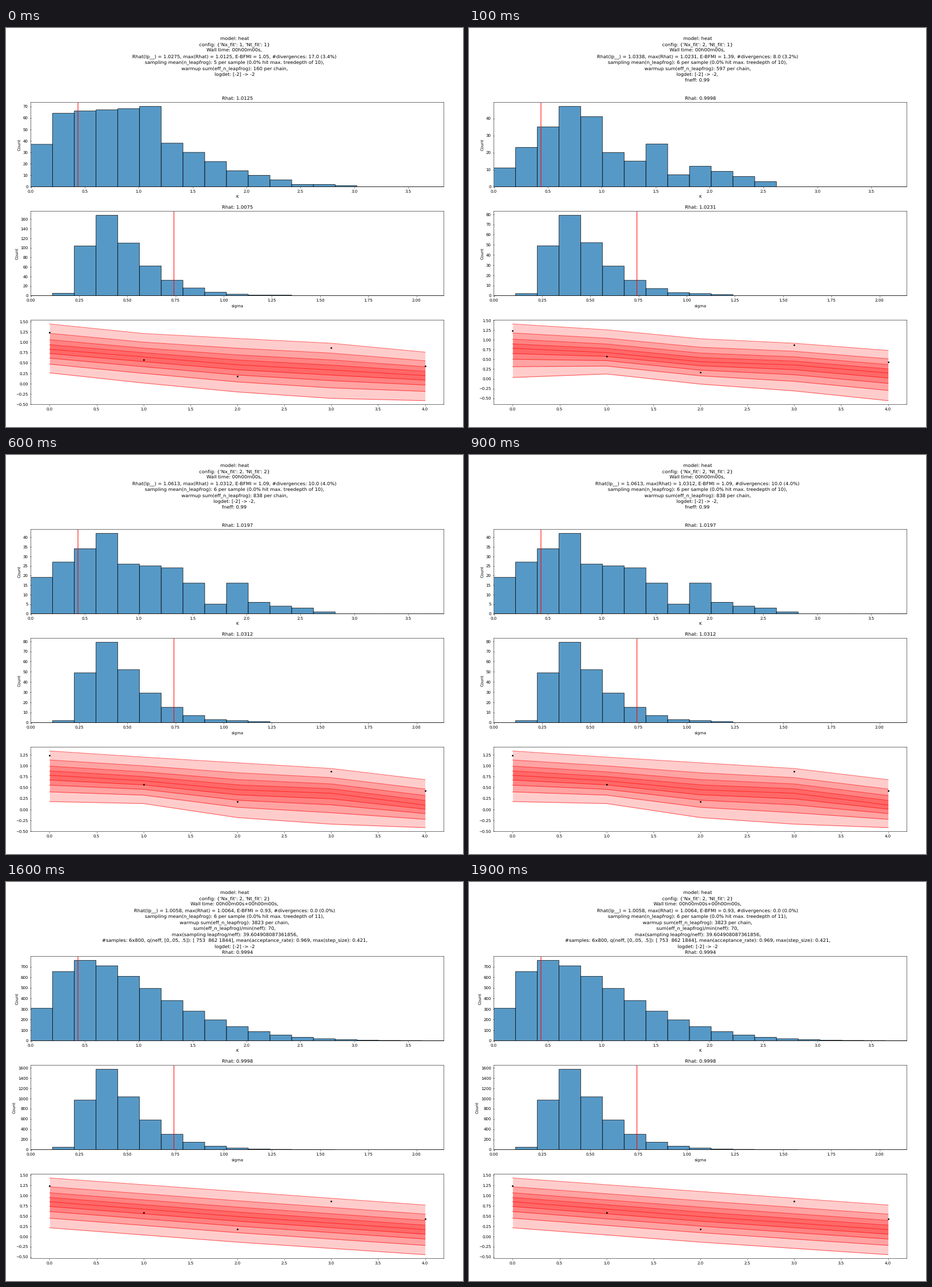
A matplotlib script that plays this animation: 800 by 700 pixels, repeating every 2100 ms.

```python
import numpy as np
import matplotlib.pyplot as plt
from matplotlib.animation import FuncAnimation

plt.rcParams["font.family"] = "DejaVu Sans"
plt.rcParams["text.hinting"] = "none"
plt.rcParams["path.snap"] = False

W, H, DPI = 800, 700, 50
STEP = 100
LINE_PITCH = 10.5
BINS = np.arange(19)
TIMES = np.arange(5)
K_MAX, K_TRUE = 3.831, 0.437
S_MAX, S_TRUE = 2.142, 0.742
OBSERVED = [1.24, 0.575, 0.175, 0.865, 0.43]
# Where the inner quantile lines lie between the median and the outermost ones.
FRACTIONS = (1, 0.63, 0.375, 0.18)


def bump(peak, mode, left, right, left_power, right_power):
    """Skewed bell over the bins, with its own width and power on each side."""
    d = BINS - mode
    fall = np.where(d < 0, (np.abs(d) / left) ** left_power,
                    (np.abs(d) / right) ** right_power)
    return np.round(peak * np.exp(-fall))


def k_posterior(peak):
    return bump(peak, 2, 2.08, 5.0, 2.6, 1.65)


def sigma_posterior(peak):
    return bump(peak, 3, 1.29, 2.0, 2.85, 1.25)


def outline(*points):
    """Counts that follow straight lines between (bin, count) points."""
    x, y = zip(*points)
    return np.round(np.interp(BINS, x, y))


def curve(*values):
    """Evenly spaced values joined by straight lines over the time span."""
    return np.interp(TIMES, np.linspace(0, TIMES[-1], len(values)), values)


def quantiles(high, mid, low):
    """Quantile lines from the highest to the lowest."""
    upper = [mid + f * (high - mid) for f in FRACTIONS]
    lower = [mid + f * (low - mid) for f in reversed(FRACTIONS)]
    return upper + [mid] + lower


def header(nt, stats, leapfrog, warmup, *rest, nx=2, wall="00h00m00s", depth=10):
    lp, worst, bfmi, divergences = stats
    return ["model: heat",
            f"config: {{'Nx_fit': {nx}, 'Nt_fit': {nt}}}",
            f"Wall time: {wall},",
            f"Rhat(lp__) = {lp}, max(Rhat) = {worst}, E-BFMI = {bfmi}, "
            f"#divergences: {divergences}",
            f"sampling mean(n_leapfrog): {leapfrog} per sample "
            f"(0.0% hit max. treedepth of {depth}),",
            f"warmup sum(eff_n_leapfrog): {warmup} per chain,",
            *rest]


def long_run(ratio, worst_ratio, neff, rate, step):
    return (f"sum(eff_n_leapfrog)/min(neff): {ratio},",
            f"max(sampling leapfrog/neff): {worst_ratio},",
            f"#samples: 6x800, q(neff, [0,.05, .5]): {neff}, "
            f"mean(acceptance_rate): {rate}, max(step_size): {step},",
            "logdet: [-2] -> -2")


SHORT_END = ("logdet: [-2] -> -2,", "fneff: 0.99")
TWO_WALLS = "00h00m00s+00h00m00s"

fits = [
    dict(head=header(1, ("1.0275", "1.0125", "1.05", "17.0 (3.4%)"), 5, 160,
                     "logdet: [-2] -> -2", nx=1),
         rhats=("1.0125", "1.0075"),
         k=outline((0, 37), (1, 64), (5, 70), (6, 38), (9, 14), (12, 2), (16, 0)),
         sigma=sigma_posterior(168),
         lines=quantiles(curve(1.44, 1.21, 1.09, 0.975, 0.76),
                         curve(0.83, 0.645, 0.455, 0.33, 0.195),
                         curve(0.26, 0.015, -0.2, -0.355, -0.41))),
    dict(head=header(1, ("1.0338", "1.0231", "1.39", "8.0 (3.2%)"), 6, 597,
                     *SHORT_END),
         rhats=("0.9998", "1.0231"),
         k=outline((0, 11), (3, 47), (4, 41), (5, 20), (6, 15), (7, 25), (8, 7),
                   (9, 12), (13, 0)),
         sigma=sigma_posterior(79),
         lines=quantiles(curve(1.41, 1.26, 1.03, 0.915, 0.73),
                         curve(0.785, 0.675, 0.44, 0.355, 0.15),
                         curve(0.035, 0.125, -0.135, -0.31, -0.56))),
    dict(head=header(2, ("1.0613", "1.0312", "1.09", "10.0 (4.0%)"), 6, 838,
                     *SHORT_END),
         rhats=("1.0197", "1.0312"),
         k=outline((0, 19), (3, 42), (4, 26), (6, 24), (7, 16), (8, 5), (9, 16),
                   (10, 6), (13, 1), (14, 0)),
         sigma=sigma_posterior(79),
         lines=quantiles(curve(1.335, 1.065, 0.935, 0.68)
                         if False else curve(1.335, 1.195, 1.065, 0.935, 0.68),
                         curve(0.78, 0.655, 0.45, 0.37, 0.1),
                         curve(0.18, 0.135, -0.185, -0.335, -0.415))),
    dict(head=header(2, ("1.0019", "1.0022", "1.12", "1.0 (0.0%)"), 3, 1084,
                     *long_run(14, "10.080012663651077", "[1630 1732 2649]",
                               "0.811", "0.842"), wall=TWO_WALLS),
         rhats=("1.0003", "1.0001"),
         k=k_posterior(755),
         sigma=sigma_posterior(1510),
         lines=quantiles(curve(1.425, 0.735),
                         curve(0.84, 0.495, 0.165),
                         curve(0.225, -0.12, -0.42))),
    dict(head=header(2, ("1.0058", "1.0064", "0.93", "0.0 (0.0%)"), 6, 3823,
                     *long_run(70, "39.604908087361856", "[ 753  862 1844]",
                               "0.969", "0.421"), wall=TWO_WALLS, depth=11),
         rhats=("0.9994", "0.9998"),
         k=k_posterior(759),
         sigma=sigma_posterior(1571),
         lines=quantiles(curve(1.425, 0.765),
                         curve(0.845, 0.485, 0.165),
                         curve(0.21, -0.14, -0.445))),
]

# The first fit shows for one step, the others for five each.
schedule = [0] + [i for i in range(1, len(fits)) for _ in range(5)]

fig = plt.figure(figsize=(W / DPI, H / DPI), dpi=DPI)
head_rows = [fig.text(0.5, 1 - (20.4 + LINE_PITCH * i) / H, "", ha="center",
                      va="baseline", fontsize=12) for i in range(10)]


def panel(top, height=148):
    return fig.add_axes([43.5 / W, 1 - (top + height) / H, 723 / W, height / H])


k_ax, s_ax, t_ax = [panel(top) for top in (130.5, 321.5, 512.5)]


def histogram(ax, counts, x_max, truth, name, rhat):
    ax.clear()
    width = x_max / len(BINS)
    ax.bar(BINS * width, counts, width, align="edge",
           facecolor=(0.122, 0.467, 0.706, 0.75), edgecolor="black", linewidth=1)
    ax.axvline(truth, color="red", linewidth=1.5)
    ax.set_xlim(0, x_max)
    ax.set_xlabel(name)
    ax.set_ylabel("Count")
    ax.set_title(f"Rhat: {rhat}")


def fan(ax, lines):
    ax.clear()
    for i in range(4):
        ax.fill_between(TIMES, lines[-1 - i], lines[i], color="red",
                        alpha=0.2, linewidth=0)
    for line in lines:
        ax.plot(TIMES, line, color="red", alpha=0.6, linewidth=1.5)
    ax.plot(TIMES, OBSERVED, "k.")


def draw(frame):
    fit = fits[schedule[frame]]
    for i, row in enumerate(head_rows):
        row.set_text(fit["head"][i] if i < len(fit["head"]) else "")
    histogram(k_ax, fit["k"], K_MAX, K_TRUE, "K", fit["rhats"][0])
    histogram(s_ax, fit["sigma"], S_MAX, S_TRUE, "sigma", fit["rhats"][1])
    fan(t_ax, fit["lines"])
    return []


anim = FuncAnimation(fig, draw, frames=len(schedule), init_func=lambda: draw(0),
                     interval=STEP, repeat=True, repeat_delay=0, blit=False)
plt.show()
```
